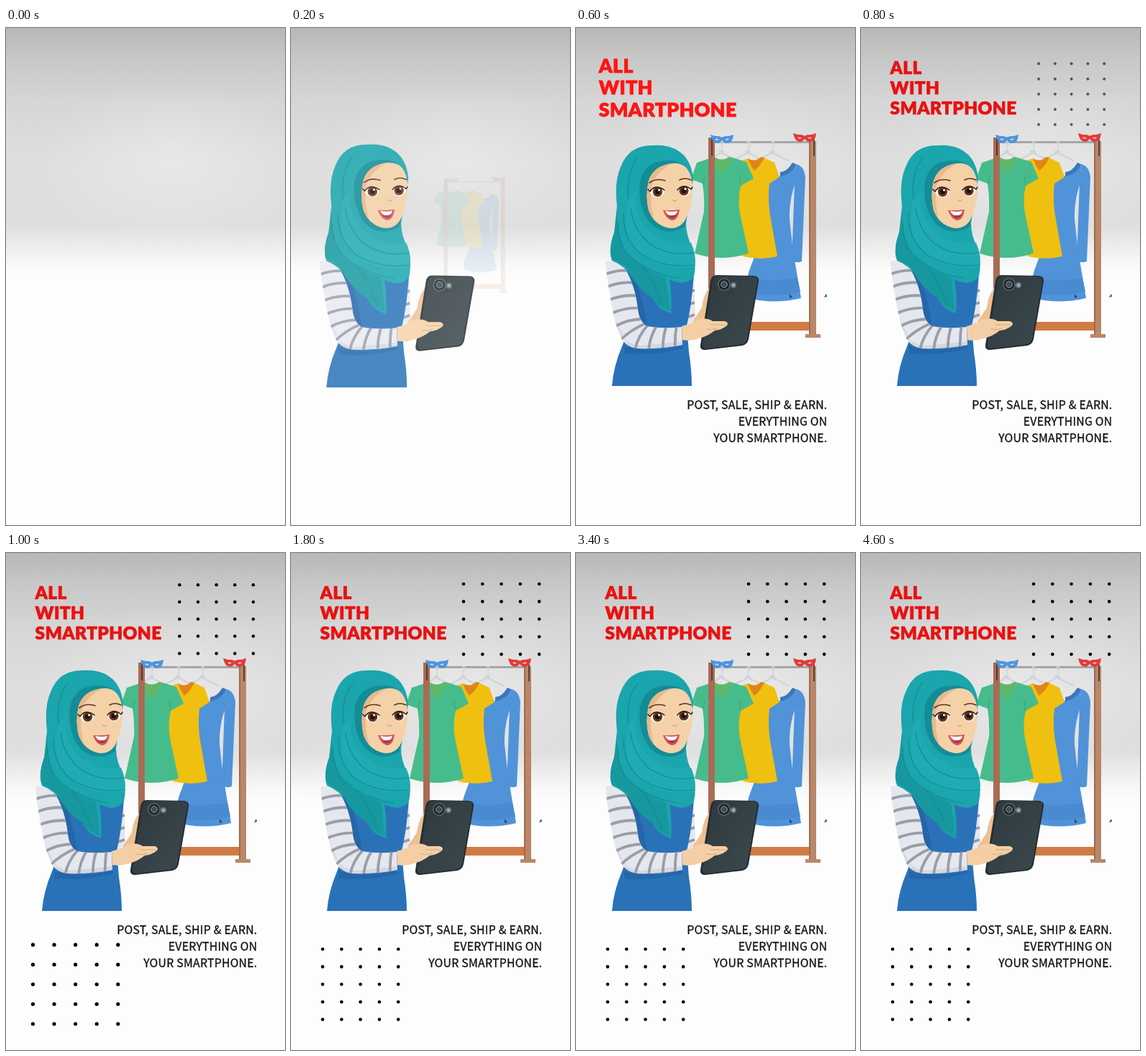
Recreate the animation shown at these times as an HTML page. Size 388 by 690 pixels, loop 5.2 s.

```html
<!DOCTYPE html>
<html lang="en">
<head>
<meta charset="utf-8">
<title>All with smartphone</title>
<style>
  html, body { margin: 0; width: 100%; height: 100%; overflow: hidden; background: #fdfdfd; }
  svg { display: block; width: 100%; height: 100%; }
  #title { font: 900 24.4px Lato, sans-serif; letter-spacing: .4px; fill: #e91111; stroke: #e91111; stroke-width: .7; stroke-linejoin: round; }
  #note { font: 500 15.8px "Noto Sans CJK JP", "Noto Sans CJK SC", Lato, sans-serif; letter-spacing: .25px; text-anchor: end; fill: #111; stroke: #111; stroke-width: .3; }
  .line { fill: none; stroke-linecap: round; stroke-linejoin: round; }
</style>
</head>
<body>
<svg viewBox="0 0 388 690">
  <defs>
    <linearGradient id="wall" x1="0" y1="0" x2="0" y2="1">
      <stop offset="0" stop-color="#b7b7b5"/>
      <stop offset=".13" stop-color="#c8c8c8"/>
      <stop offset=".3" stop-color="#d6d6d6"/>
      <stop offset=".54" stop-color="#dedede"/>
      <stop offset=".8" stop-color="#dfdfdf"/>
      <stop offset=".87" stop-color="#ebebeb"/>
      <stop offset=".95" stop-color="#f8f8f8"/>
      <stop offset="1" stop-color="#fdfdfd"/>
    </linearGradient>
    <radialGradient id="glow">
      <stop offset="0" stop-color="#f2f2f2" stop-opacity=".5"/>
      <stop offset="1" stop-color="#f2f2f2" stop-opacity="0"/>
    </radialGradient>
    <linearGradient id="case" x1="0" y1="0" x2="1" y2="1">
      <stop offset="0" stop-color="#2e393e"/>
      <stop offset="1" stop-color="#3c494d"/>
    </linearGradient>
    <path id="sleeve" d="M41 326Q43 350 48 375Q52 403 61 427Q68 443 86 445Q120 446 148 440L147 415Q120 418 99 414Q88 408 86 390Q82 355 66 330Q52 319 41 326Z"/>
    <clipPath id="inSleeve"><use href="#sleeve"/></clipPath>
    <path id="mask" d="M0 0Q8 3 12 2Q16 5 20 2Q24 3 32 0Q31 13 22 12Q18 11 16 8Q14 11 10 12Q2 12 0 0ZM6 6Q8 9 12 7Q9 5 6 6ZM26 6Q24 9 20 7Q23 5 26 6Z" fill-rule="evenodd"/>
    <g id="hanger" class="line" stroke="#cfd4da">
      <path d="M-1 -9Q-1 -13 2 -12Q5 -9 1 -7V0" stroke-width="1.5"/>
      <path d="M0 3L-21 14M0 3L22 14" stroke-width="2.4"/>
      <path d="M0 0V4" stroke-width="7" stroke-linecap="butt"/>
    </g>
  </defs>

  <rect width="388" height="345" fill="url(#wall)"/>
  <ellipse cx="230" cy="185" rx="190" ry="110" fill="url(#glow)"/>

  <g id="rack">
    <path d="M189 157H328V160H189Z" fill="#a4a6a8"/>
    <path d="M188 408H326V420H188Z" fill="#d07b43"/>
    <use href="#hanger" x="202" y="170"/>
    <use href="#hanger" x="239" y="170"/>
    <use href="#hanger" x="273" y="170"/>
    <!-- blue dress -->
    <path d="M265 212L284 205L306 189L305 215Q296 240 297 266L302 310L313 375Q272 385 232 373Q239 330 262 290Z" fill="#5093d9"/>
    <path d="M306 189Q317 191 319 207L314 324Q307 327 300 323L304 215Z" fill="#5093d9"/>
    <path d="M284 206Q300 203 306 189L301 187Q293 200 284 200Z" fill="#3c77bc"/>
    <path d="M234 347Q273 353 308 347L312 366Q272 376 233 366Z" fill="#4a8ad0"/>
    <path d="M297 369L301 374L297 375Z" fill="#244c62"/>
    <!-- yellow dress -->
    <path d="M230 184L240 181Q249 198 261 180L276 187L283 207L269 216Q266 240 271 266L280 317Q258 323 232 317L222 230Z" fill="#efc00f"/>
    <path d="M239 181Q243 192 248 198Q257 191 262 180L257 179Q249 187 239 181Z" fill="#e18418"/>
    <!-- green dress -->
    <path d="M189 180Q199 201 202 202Q209 197 218 180L237 186L247 209L229 219Q224 239 229 262L240 313Q202 325 165 313L178 255Q179 235 176 216L160 210L168 187Z" fill="#46bc8c"/>
    <path d="M189 180Q193 192 202 203Q212 194 218 180L213 179Q203 186 192 179Z" fill="#5fb86a"/>
    <path d="M229 219L227 205M177 217L179 204" class="line" stroke="#35a577" stroke-width="1"/>
    <!-- frame -->
    <path d="M184 152H193V426H200V430H178V426H184Z" fill="#a96b55"/>
    <path d="M324 157H334V425H340V430H319V425H324Z" fill="#b98769"/>
    <path d="M324 157H326V425H324Z" fill="#a2694d"/>
    <path d="M189 152V177M331 154V178" stroke="#383330" stroke-width="1.6"/>
    <use href="#mask" x="187" y="148" fill="#4d94dc"/>
    <use href="#mask" x="302" y="146" fill="#e33a3a"/>
    <path d="M345 374L348 369L349 373Z" fill="#35524f"/>
  </g>

  <g id="woman">
    <!-- far sleeve and dress -->
    <path d="M150 345L164 345L166 405L150 416Z" fill="#e5e7ee"/>
    <path d="M150 369L165 364M150 386L165 381M150 403L165 398" stroke="#989ba6" stroke-width="3.6"/>
    <path d="M42 325Q70 320 100 335L164 340Q161 385 154 413L157 450Q161 475 161 497H50Q52 470 64 442L80 400Q62 350 42 325Z" fill="#2a72b8"/>
    <path d="M66 441Q100 452 148 441L149 445Q104 456 68 452Z" fill="#2566a8"/>
    <path d="M66 330Q82 355 86 390Q88 408 99 414Q94 380 84 352Z" fill="#2566a8"/>
    <!-- near sleeve -->
    <use href="#sleeve" fill="#e5e7ee"/>
    <g clip-path="url(#inSleeve)">
      <path d="M40 342Q58 335 76 337M42 360Q62 351 84 354M45 378Q66 369 88 372M48 397Q69 387 91 389M53 415Q72 404 94 404M62 433Q76 419 97 410M82 449Q84 430 101 411M101 449Q102 430 112 414M121 449Q120 430 126 413M138 447Q137 430 140 412" class="line" stroke="#9a9da8" stroke-width="3.8"/>
      <path d="M52 400Q62 440 90 441L148 435V447H75Z" fill="#8f96ac" opacity=".2"/>
    </g>
    <!-- thumb side, phone, hand -->
    <path d="M186 360Q177 370 175 388L162 408L178 425L190 390Z" fill="#eec092"/>
    <path d="M196 343L248 344Q255 345 254 352L240 432Q238 440 231 441L179 447Q172 447 173 440L187 352Q188 343 196 343Z" fill="#242e32"/>
    <path d="M197 344L247 345Q253 346 252 352L238 431Q237 438 230 439L181 445Q175 445 176 438L190 352Q191 345 197 344Z" fill="url(#case)"/>
    <circle cx="206" cy="356" r="9" fill="#59656a"/>
    <circle cx="206" cy="356" r="7.4" fill="#1c2428"/>
    <circle cx="206" cy="356" r="4.3" fill="#3e4d54" stroke="#8b989e"/>
    <circle cx="219" cy="357" r="4" fill="#69777c"/>
    <circle cx="219" cy="357" r="2" fill="#aab4b7"/>
    <path d="M147 414Q160 411 168 405Q182 401 190 407L207 407Q213 409 210 413Q203 419 193 420Q183 428 171 431Q160 435 148 433Z" fill="#f4cfa5"/>
    <path d="M187 412L208 412M181 418Q189 420 196 417" class="line" stroke="#d8a67a" stroke-width="1"/>
    <!-- scarf -->
    <path d="M109 163Q74 161 62 193Q53 213 57 247Q57 274 51 290Q45 312 50 323Q68 330 80 348Q91 365 106 374Q113 390 132 396Q134 374 130 349Q153 360 164 345Q168 326 163 307Q153 289 153 271L163 210Q160 174 130 165Q118 162 109 163Z" fill="#1ba5ad"/>
    <path d="M130 184Q96 183 89 213Q85 250 104 272Q126 291 151 276L162 213Q154 184 130 184Z" fill="#148c96"/>
    <path d="M57 247Q56 292 73 316Q95 337 125 346L131 393Q111 386 106 374Q82 360 70 332L50 320Q45 305 53 285Z" fill="#17989f"/>
    <path d="M84 224Q78 256 99 279Q128 305 160 298Q169 320 164 332Q110 338 82 306Q64 286 72 241Z" fill="#20abb2"/>
    <g class="line" stroke="#128c95" stroke-width="1.2">
      <path d="M76 250Q80 281 103 300Q130 318 164 312"/>
      <path d="M66 257Q65 294 92 315Q124 334 164 329"/>
      <path d="M58 270Q57 305 82 323Q109 343 143 347"/>
      <path d="M86 180Q69 202 73 237M91 330Q108 350 120 385"/>
    </g>
    <!-- face -->
    <path d="M134 188Q108 191 101 212Q96 234 101 253Q108 272 126 277Q142 281 151 268Q160 253 162 228Q163 202 151 192Q143 187 134 188Z" fill="#f5d1a8"/>
    <path d="M134 188Q108 191 101 212Q96 234 101 253Q104 261 109 267Q102 246 105 219Q112 199 134 188Z" fill="#e9b98b"/>
    <path d="M102 215Q111 208 124 212M144 211Q151 207 160 211" class="line" stroke="#5a3526" stroke-width="1.6"/>
    <path d="M103 228Q109 217 123 227Q120 235 113 235Q106 234 103 228ZM142 226Q149 216 160 225Q157 233 151 234Q144 233 142 226Z" fill="#fff"/>
    <g fill="#633823"><circle cx="113.500" cy="227.500" r="6.7"/><circle cx="150" cy="226" r="6.6"/></g>
    <g fill="#20120e"><circle cx="113.500" cy="227.500" r="3.6"/><circle cx="150" cy="226" r="3.5"/></g>
    <g fill="#fff"><circle cx="115.500" cy="225" r="1.5"/><circle cx="152" cy="223.500" r="1.5"/></g>
    <path d="M100 224L103 227Q110 216 123 225M141 225Q149 215 160 224L162 221" class="line" stroke="#2b1813" stroke-width="1.4"/>
    <path d="M135 239Q138 242 140 239" class="line" stroke="#d39b72" stroke-width="1.2"/>
    <path d="M121 253Q132 254 144 252Q142 267 133 267Q125 265 121 253Z" fill="#d1545a"/>
    <path d="M124 254Q133 256 141 254Q139 261 133 261Q127 260 124 254Z" fill="#fff"/>
    <path d="M127 260Q134 261 140 259Q138 264 133 264Q129 263 127 260Z" fill="#a33a42"/>
  </g>

  <g id="title">
    <text x="40.500" y="63.500">ALL</text>
    <text x="40.500" y="91.500">WITH</text>
    <text x="40.500" y="119.500">SMARTPHONE</text>
  </g>
  <g id="note">
    <text x="349.500" y="529">POST, SALE, SHIP &amp; EARN.</text>
    <text x="349.500" y="552">EVERYTHING ON</text>
    <text x="349.500" y="575">YOUR SMARTPHONE.</text>
  </g>
  <g id="dotsTop"></g>
  <g id="dotsLow"></g>
</svg>
<script>
const LOOP = 5200;
const $ = id => document.getElementById(id);

function dotGrid(id, x, y) {
  let dots = '';
  for (let i = 0; i < 25; i++)
    dots += `<circle cx="${x + i % 5 * 26.3}" cy="${y + Math.floor(i / 5) * 24.4}" r="2.3"/>`;
  $(id).innerHTML = dots;
}
dotGrid('dotsTop', 240, 43);
dotGrid('dotsLow', 44, 550);

// Each part pops in around its pivot; keys are [ms, scale, opacity].
const parts = [
  { id: 'woman', pivot: [137, 285], keys: [[50, .5, 0], [250, 1.1, 1], [400, .967, 1], [550, 1, 1]] },
  { id: 'rack', pivot: [250, 286], keys: [[150, .5, 0], [400, 1.13, 1], [590, 1, 1]] },
  { id: 'note', pivot: [185, 546], keys: [[350, .5, 0], [400, .6, .2], [520, 1.08, 1], [600, 1, 1]] },
  { id: 'title', pivot: [138, 83], keys: [[460, .5, 0], [600, 1.09, 1], [780, 1, 1]] },
  { id: 'dotsTop', pivot: [293, 92], keys: [[700, .5, 0], [880, 1.12, 1], [1000, .975, 1], [1200, 1, 1]] },
  { id: 'dotsLow', pivot: [96.5, 598.5], keys: [[800, .5, 0], [1000, 1.125, 1], [1200, 1, 1]] }
];

function sample(keys, t) {
  const n = keys.findIndex(k => k[0] > t);
  if (n === 0) return keys[0];
  if (n < 0) return keys[keys.length - 1];
  const a = keys[n - 1], b = keys[n];
  const p = (t - a[0]) / (b[0] - a[0]);
  const e = p * p * (3 - 2 * p);
  return a.map((v, i) => v + (b[i] - v) * e);
}

function draw() {
  const t = performance.now() % LOOP;
  for (const { id, pivot: [x, y], keys } of parts) {
    const [, scale, opacity] = sample(keys, t);
    const el = $(id);
    el.setAttribute('transform', `translate(${x} ${y}) scale(${scale}) translate(${-x} ${-y})`);
    el.style.opacity = opacity;
    // overshoot also brightens the colours
    el.style.filter = scale > 1 ? `brightness(${1 + (scale - 1) * 1.9})` : 'none';
  }
  requestAnimationFrame(draw);
}
draw();
</script>
</body>
</html>
```
